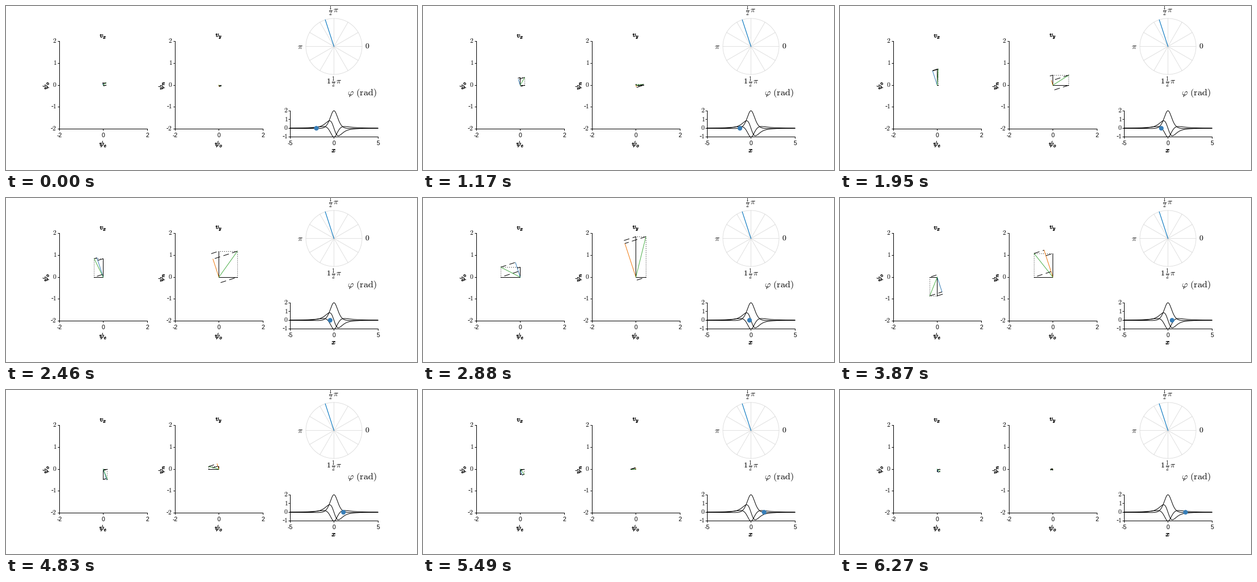
These frames come from a looping animation (725x290 px, 6300 ms). A matplotlib script:

```python
import numpy as np
import matplotlib.pyplot as plt
from matplotlib.animation import FuncAnimation
from matplotlib.patches import Circle
from matplotlib.patheffects import withStroke

W, H = 725, 290
FRAMES, STEP_MS = 210, 30
BLUE, GREEN, ORANGE, GREY = "#377eb8", "#4daf4a", "#f07a10", "#d9d9d9"
PHI = 0.6 * np.pi
AXIS = np.array([np.cos(PHI), np.sin(PHI)])

plt.rcParams.update({
    "mathtext.fontset": "cm",
    "font.family": "Liberation Serif",
    "path.snap": False,
    "lines.dash_capstyle": "butt",
    "lines.scale_dashes": False,
})

# Coordinates are pixels, integers at pixel centres
fig = plt.figure(figsize=(W / 72, H / 72), dpi=72, facecolor="white")
ax = fig.add_axes([0, 0, 1, 1])
ax.set_xlim(-0.5, W - 0.5)
ax.set_ylim(H - 0.5, -0.5)
ax.axis("off")


def wavelets(x):
    """Even, odd and normal dipole wavelets."""
    d = (1 + x**2) ** 2.5
    return (2 * x**2 - 1) / d, -3 * x / d, (2 - x**2) / d


def line(xs=(), ys=(), color="black", lw=1.0, **kw):
    return ax.plot(xs, ys, color=color, lw=lw, **kw)[0]


def label(x, y, s, size=11.5, ha="center", **kw):
    return ax.text(x, y, s, size=size, ha=ha, va="center", **kw)


def symbol(x, y, s, size=12.5, **kw):
    heavy = [withStroke(linewidth=0.4, foreground="black")]
    label(x, y, s, size, path_effects=heavy, **kw)


def number(v):
    return ("-" if v < 0 else "") + f"${abs(v)}$"


def axes_frame(left, top, right, bottom, xticks, yticks, x_gap, y_gap):
    line([left, left, right], [top, bottom, bottom])
    for v, x in zip(xticks, np.linspace(left, right, len(xticks))):
        line([int(x)] * 2, [bottom, bottom + 2.5])
        label(x, bottom + x_gap, str(v), 10.5, family="Liberation Sans")
    for v, y in zip(yticks, np.linspace(bottom, top, len(yticks))):
        line([left - 2.5, left], [round(y)] * 2)
        label(left - y_gap, y - 0.3, number(v), ha="right")


class VectorPanel:
    UNIT = 38.75

    def __init__(self, left, title, xlabel, ylabel, color):
        self.origin = np.array([left + 77, 139.5])
        axes_frame(left, 62, left + 155, 217, (-2, 0, 2), range(-2, 3), 11, 5)
        mid = left + 77
        symbol(mid, 53, title, 12)
        symbol(mid, 244, xlabel)
        symbol(left - 24, 140, ylabel, rotation=90)
        self.parts = line()
        self.box = line(ls=(0, (1, 2.6)))
        self.proj = line(color=color)
        self.sum = line(color=GREEN)
        self.drops = [line(ls=(0, (10, 6))) for _ in range(3)]

    def draw(self, artist, *points, crisp=False):
        px = self.origin + self.UNIT * np.array(points) * (1, -1)
        if crisp:
            px = np.round(px)
        artist.set_data(px[:, 0], px[:, 1])

    def update(self, a, b):
        zero, pa, pb, tip = (np.array(p) for p in ((0, 0), (a, 0), (0, b), (a, b)))
        foot = [p @ AXIS * AXIS for p in (tip, pa, pb)]
        self.draw(self.parts, pa, zero, pb, crisp=True)
        self.draw(self.box, pa, tip, pb, crisp=True)
        self.draw(self.proj, zero, foot[0])
        self.draw(self.sum, zero, tip)
        self.draw(self.drops[0], tip, foot[0])
        self.draw(self.drops[1], foot[1], pa)
        self.draw(self.drops[2], foot[2], pb)


def draw_dial(cx=578, cy=71, r=49.5):
    for k in range(12):
        t = k * np.pi / 6
        line([cx, cx + r * np.cos(t)], [cy, cy - r * np.sin(t)], GREY, 0.8)
    ax.add_patch(Circle((cx, cy), r, fill=False, ec=GREY, lw=0.8))
    line([cx, cx + r * AXIS[0]], [cy, cy - r * AXIS[1]], "#0072bd", 1.1)
    label(637, 71, "$0$", 14)
    label(518, 72, r"$\pi$", 14)
    label(578, 8, r"$\frac{1}{2}\,\pi$", 14)
    label(578.5, 134.5, r"$1\,\frac{1}{2}\,\pi$", 14)
    label(628, 153, r"$\varphi\ \mathrm{(rad)}$", 16.3)


def draw_curves():
    axes_frame(501, 185, 656, 231, (-5, 0, 5), range(-1, 3), 11, 4)
    symbol(578, 255, "$x$", 12)
    x = np.linspace(-5, 5, 400)
    for y in wavelets(x):
        line(578 + 15.5 * x, 215.7 - 15.5 * y)


panels = (
    VectorPanel(94, "$v_x$", r"$\psi_e$", r"$\psi_o$", BLUE),
    VectorPanel(298, "$v_y$", r"$\psi_o$", r"$\psi_n$", ORANGE),
)
draw_dial()
draw_curves()
dot = ax.add_patch(Circle((0, 215.7), 4.1, color=BLUE, lw=0, zorder=5))


def update(i):
    x = -2 + 4 * i / (FRAMES - 1)
    even, odd, normal = wavelets(x)
    panels[0].update(even, odd)
    panels[1].update(odd, normal)
    dot.center = (578 + 15.5 * x, 215.7)


anim = FuncAnimation(fig, update, frames=FRAMES, interval=STEP_MS,
                     init_func=lambda: update(0), repeat=True, blit=False)
plt.show()
```
